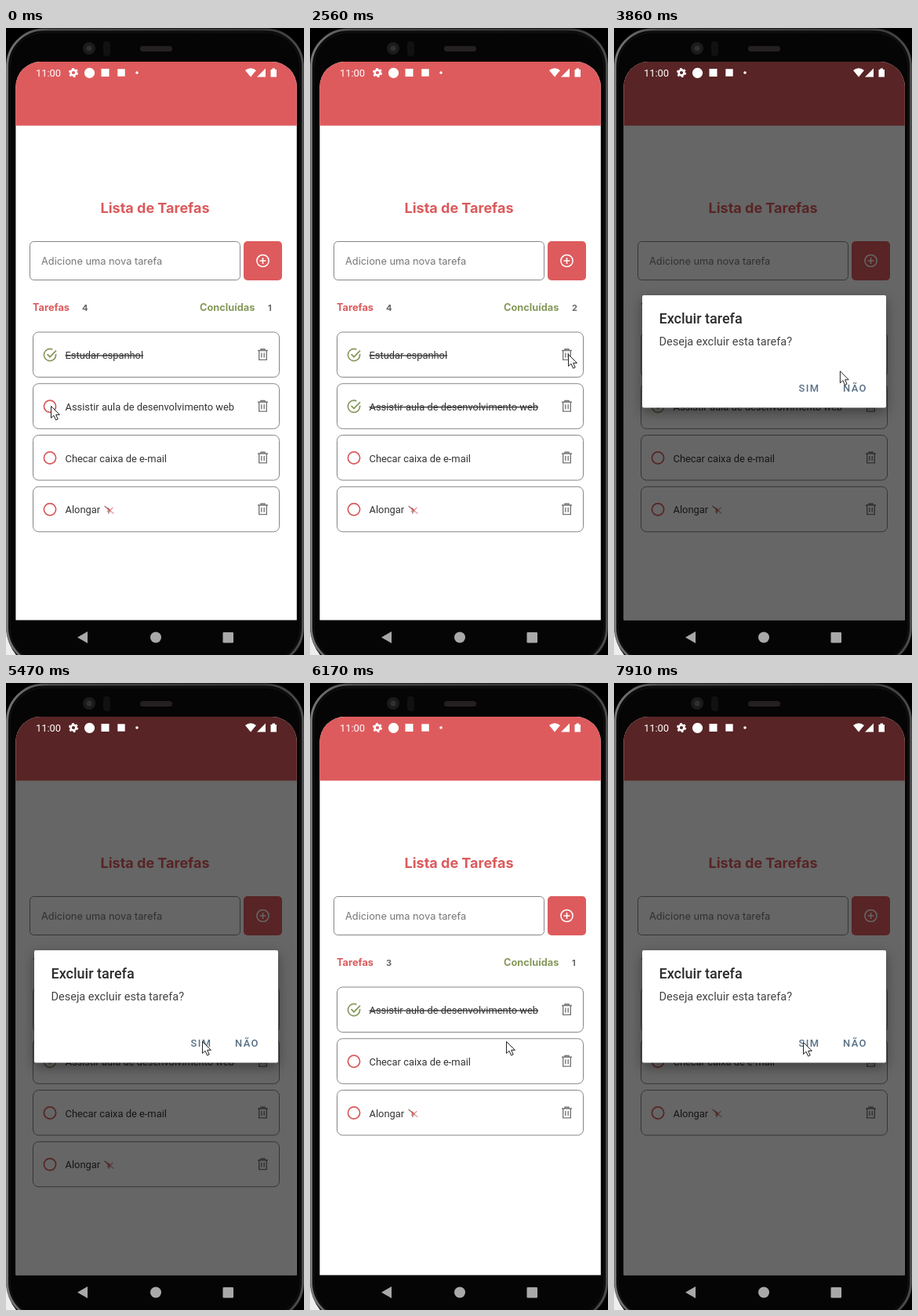
An HTML page that plays this animation: 380 px wide and 800 px high, repeating every 8 s.

```html
<!DOCTYPE html>
<html lang="pt-BR">
<head>
<meta charset="utf-8">
<title>Lista de Tarefas</title>
<style>
html, body { margin: 0; width: 100%; height: 100%; overflow: hidden; background: #000; }
svg { display: block; width: 100vw; height: 100vh; }
text { font: 12.9px Roboto, sans-serif; fill: #333; }
.inter { font-family: Inter, sans-serif; font-size: 12.8px; }
.bold { font-weight: 700; }
.red { fill: #db5a5c; }
.green { fill: #87985b; }
.count { font-size: 11px; fill: #666; }
.done { text-decoration: line-through; }
.button { font-weight: 500; letter-spacing: 1.4px; fill: #587086; }
.line { fill: none; stroke: #858585; }
#panel { filter: drop-shadow(0 6px 8px rgba(0, 0, 0, .38)); }
</style>
</head>
<body>
<svg viewBox="0 0 380 800">
  <defs>
    <clipPath id="screen"><path d="M12.4 755.5V75a32 32 0 0 1 32-32H338.8a32 32 0 0 1 32 32V755.5z"/></clipPath>
    <linearGradient id="rim">
      <stop stop-color="#777"/><stop offset=".15" stop-color="#484848"/>
      <stop offset=".85" stop-color="#333"/><stop offset="1" stop-color="#4c4c4c"/>
    </linearGradient>
    <g id="trash" class="line" stroke-width="1.4">
      <path d="M-6.5-5.5H6.5M-2.5-5.5V-7.2H2.5V-5.5M-4.8-5.5V6.4H4.8V-5.5M-1.7-2.5V3.6M1.7-2.5V3.6" stroke="#777"/>
    </g>
    <circle id="open" r="7.6" fill="none" stroke="#d85b5c" stroke-width="1.7"/>
    <path id="check" d="M7.6-1V0A7.6 7.6 0 1 1 3.3-6.8M-3.5-.8 0 2.7 8-5.4" fill="none" stroke="#87985b" stroke-width="1.7"/>
    <g id="gymnast" fill="none" stroke-linecap="round" stroke-width="1.2">
      <path d="M-5-4 0 0 0 5" stroke="#946055"/>
      <path d="M-1-1 2 2" stroke="#d8585c" stroke-width="2.3"/>
      <path d="M2 1 5-2M2 2 6 5" stroke="#d99b91"/>
      <circle cx="-1" cy="2.5" r=".9" fill="#b98073" stroke="none"/>
    </g>
  </defs>

  <rect width="380" height="800"/>
  <path d="M0 766Q2 787 13 800H0z" fill="#eee"/>
  <rect x="1.5" y="2" width="377" height="810" rx="47" fill="#090909" stroke="url(#rim)" stroke-width="3"/>
  <rect x="5" y="6" width="370" height="803" rx="43" fill="#050505" stroke="#151515"/>
  <circle cx="106" cy="26" r="8" fill="#1b1b1b"/>
  <circle cx="106" cy="26" r="3.5" fill="#303030"/>
  <rect x="124" y="17" width="9" height="19" rx="4" fill="#111"/>
  <rect x="171" y="23" width="41" height="7" rx="3.5" fill="#242021"/>

  <g clip-path="url(#screen)">
    <rect x="12" y="43" width="359" height="713" fill="#fff"/>
    <rect x="12" y="43" width="359" height="81.6" fill="#de5b5d"/>
    <text class="inter bold red" x="120.5" y="236" style="font-size:18px">Lista de Tarefas</text>
    <rect class="line" x="30.5" y="272.5" width="268" height="49" rx="5"/>
    <text class="inter" x="45" y="302" style="fill:#777">Adicione uma nova tarefa</text>
    <rect x="303" y="272" width="49" height="50" rx="5" fill="#de5b5d"/>
    <g fill="none" stroke="#fff" stroke-width="1.5">
      <circle cx="327.5" cy="297" r="7.6"/><path d="M323.5 297h8M327.5 293v8"/>
    </g>
    <text class="inter bold red" x="34" y="361">Tarefas</text>
    <text class="inter bold count" x="97" y="360.5" id="total"></text>
    <text class="inter bold green" x="247" y="361">Concluídas</text>
    <text class="inter bold count" x="334" y="360.5" id="finished"></text>
    <g id="list"></g>
    <rect id="dim" x="12" y="43" width="359" height="713"/>
  </g>

  <g fill="#fff">
    <text x="38" y="62" style="fill:#fff">11:00</text>
    <circle cx="86" cy="57" r="3.4" fill="none" stroke="#fff" stroke-width="2.6"/>
    <circle cx="86" cy="57" r="5.2" fill="none" stroke="#fff" stroke-width="1.8" stroke-dasharray="2.7 2.745"/>
    <circle cx="106.5" cy="57.3" r="6.6"/>
    <rect x="121.5" y="52" width="10" height="10"/>
    <rect x="142.3" y="52.3" width="9.4" height="9.4"/>
    <circle cx="167" cy="57" r="1.8"/>
    <path d="M305 54Q312 48.5 319 54L312 62.5z"/>
    <path d="M331 51.5V62.5H320z"/>
    <path d="M337.5 53H339.5V51.5H343V53H345V62.5H337.5z"/>
  </g>
  <g fill="#a9a9a9">
    <path d="M91 777.5 104 770V785z"/>
    <circle cx="191" cy="777.5" r="7"/>
    <rect x="276.5" y="771" width="13.5" height="13.5" rx="1"/>
  </g>

  <g id="dialog">
    <rect id="panel" x="36" y="341" width="311" height="143.5" rx="2" fill="#fff"/>
    <text x="57.5" y="377" style="font-size:18px;font-weight:500;fill:#2b2b2b">Excluir tarefa</text>
    <text x="57.5" y="405" style="font-size:14.5px;fill:#444">Deseja excluir esta tarefa?</text>
    <text class="button" x="235.5" y="464">SIM</text>
    <text class="button" x="292" y="464">NÃO</text>
  </g>
  <path id="cursor" d="M.5.5V15.6L4 12.4 6.6 18.2 9.2 17 6.7 11.4H11.4z" fill="#fff" stroke="#222"/>
</svg>
<script>
const LOOP = 8000, CHECKED = 300, DELETED = 5760;
const $ = id => document.getElementById(id);
const clamp = v => Math.max(0, Math.min(1, v));
const tasks = ['Estudar espanhol', 'Assistir aula de desenvolvimento web', 'Checar caixa de e-mail', 'Alongar'];

// Pointer stops: time, x, y
const stops = [
  [0, 57, 482], [850, 57, 482], [1650, 317, 456], [1750, 317, 456],
  [2350, 329, 416], [3450, 329, 416], [4250, 250, 457], [6250, 250, 457],
  [6800, 328, 413], [7250, 328, 413], [7800, 241, 458], [LOOP, 241, 458]
];

function pointer(t) {
  const i = stops.findIndex(s => s[0] > t);
  const [t0, x0, y0] = stops[i - 1], [t1, x1, y1] = stops[i];
  const k = (t - t0) / (t1 - t0), e = k * k * (3 - 2 * k);
  return [x0 + (x1 - x0) * e, y0 + (y1 - y0) * e];
}

function card(name, row, done) {
  return `<g transform="translate(0 ${row * 65.75})">
    <rect class="line" x="34.5" y="388" width="314" height="57.5" rx="7"/>
    <use href="#${done ? 'check' : 'open'}" x="56" y="417"/>
    <text class="${done ? 'done' : ''}" x="75.5" y="422">${name}</text>
    ${name === 'Alongar' ? '<use href="#gymnast" x="131" y="417"/>' : ''}
    <use href="#trash" x="327.5" y="417"/></g>`;
}

let shown = '';
function showList(first, doneUntil) {
  const key = first + '/' + doneUntil;
  if (key === shown) return;
  shown = key;
  $('list').innerHTML = tasks.slice(first).map((name, row) => card(name, row, row + first < doneUntil)).join('');
  $('total').textContent = tasks.length - first;
  $('finished').textContent = doneUntil - first;
}

function render(t) {
  showList(t < DELETED ? 0 : 1, t < CHECKED ? 1 : 2);
  const age = t < 6500 ? t - 2613 : t - 6959;
  const leaving = t < 6500 ? 1 - clamp((t - DELETED) / 200) : 1;
  $('dim').setAttribute('opacity', .6 * clamp(age / 220) * leaving);
  $('dialog').setAttribute('opacity', (1 - (1 - clamp(age / 165)) ** 2) * leaving);
  $('cursor').setAttribute('transform', `translate(${pointer(t)})`);
}

function frame() {
  render(performance.now() % LOOP);
  requestAnimationFrame(frame);
}
frame();
</script>
</body>
</html>
```
